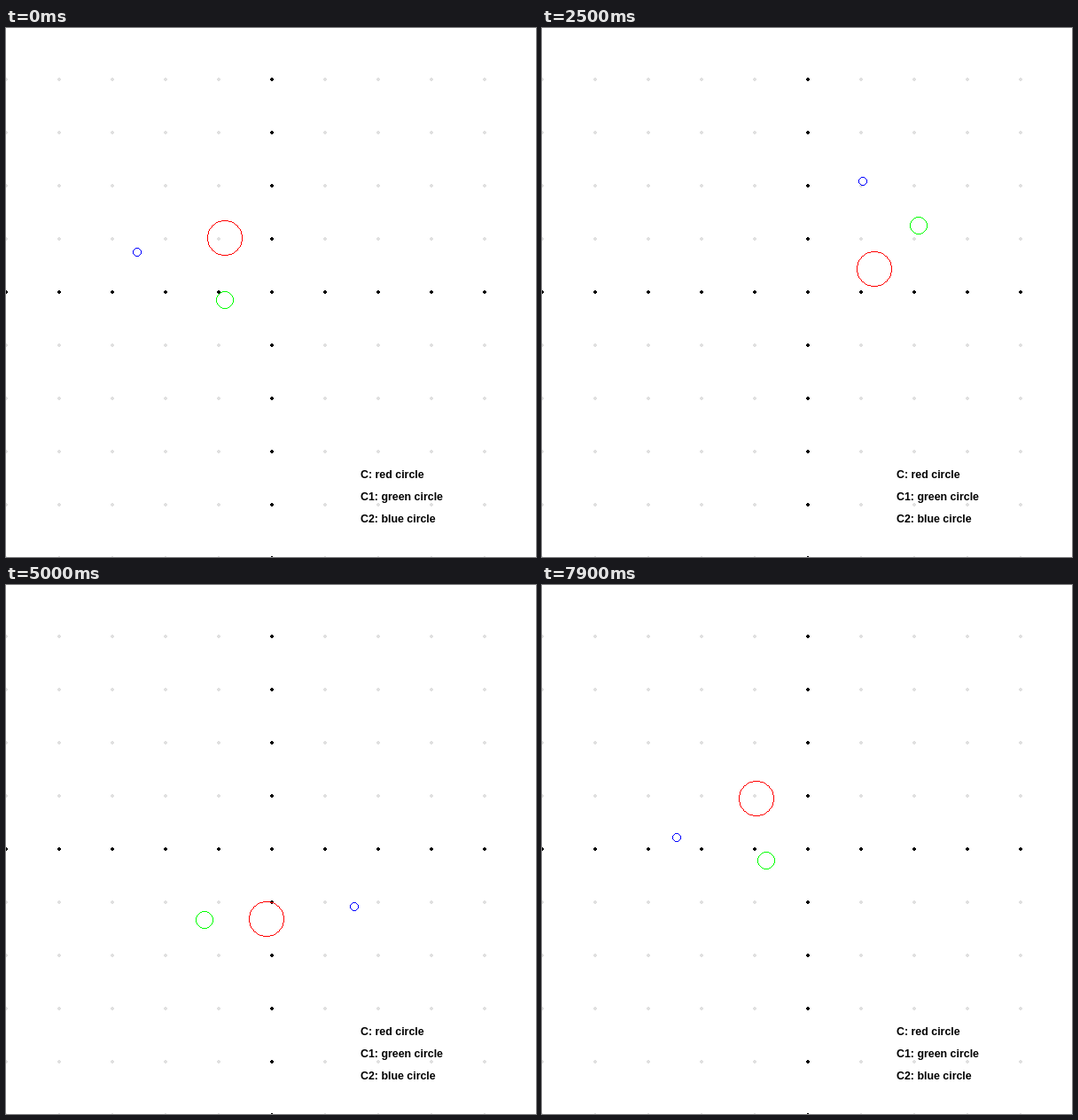
An HTML page with a canvas for the animation above (8 s loop, 598x597 px).

```html
<!DOCTYPE html>
<html lang="en">
<head>
<meta charset="utf-8">
<title>Circles on circles</title>
<style>
  html, body { margin: 0; width: 100%; height: 100%; overflow: hidden; background: #fff; }
  canvas { display: block; }
</style>
</head>
<body>
<canvas id="stage" width="598" height="597"></canvas>
<script>
const ctx = document.getElementById('stage').getContext('2d');
const ORIGIN = { x: 300, y: 298 };
const GRID = 60;
const STEP_MS = 100;
const STEPS = 80;
const TICKS_PER_STEP = 7.859;
const TICK = 0.01; // radians

const rad = deg => deg * Math.PI / 180;

function orbit(center, radius, angle) {
  return {
    x: center.x + radius * Math.cos(angle),
    y: center.y - radius * Math.sin(angle)
  };
}

function dot(x, y, color) {
  ctx.fillStyle = color;
  ctx.fillRect(x - 1, y - 2, 2, 4);
  ctx.fillRect(x - 2, y - 1, 4, 2);
}

// One pixel wide ring without smoothing, mirrored over eight octants.
function ring(center, r, color) {
  const cx = Math.floor(center.x);
  const cy = Math.floor(center.y);
  ctx.fillStyle = color;
  for (let i = 0, d = r; i <= d; i++) {
    d = Math.round(Math.sqrt((r - 0.5) ** 2 - (i + 0.5) ** 2) - 0.5);
    if (i > d) break;
    for (const [a, b] of [[i, d], [d, i]]) {
      for (const x of [cx + a, cx - a - 1]) {
        for (const y of [cy + b, cy - b - 1]) ctx.fillRect(x, y, 1, 1);
      }
    }
  }
}

function drawGrid() {
  for (let x = 0; x <= 540; x += GRID) {
    for (let y = 58; y <= 598; y += GRID) {
      const onAxis = x === ORIGIN.x || y === ORIGIN.y;
      dot(x, y, onAxis ? '#000' : '#e0e0e0');
    }
  }
}

function drawLegend() {
  ctx.fillStyle = '#000';
  ctx.font = 'bold 12.4px "Liberation Sans", Arial, sans-serif';
  ['C: red circle', 'C1: green circle', 'C2: blue circle']
    .forEach((line, i) => ctx.fillText(line, 400, 508 + 25 * i));
}

function draw(step) {
  const turn = TICK * Math.ceil(step * TICKS_PER_STEP);
  const red = orbit(ORIGIN, 80, rad(131.25) - turn);
  const green = orbit(red, 70, rad(-89.5) - 2 * turn);
  const blue = orbit(red, 100, rad(-171) - 4 * turn);

  ctx.fillStyle = '#fff';
  ctx.fillRect(0, 0, 598, 597);
  drawGrid();
  drawLegend();
  ring(red, 20, '#f00');
  ring(green, 10, '#0f0');
  ring(blue, 5, '#00f');
}

const start = performance.now();

function frame() {
  const elapsed = performance.now() - start;
  draw(Math.floor(elapsed / STEP_MS) % STEPS);
  requestAnimationFrame(frame);
}

frame();
</script>
</body>
</html>
```
